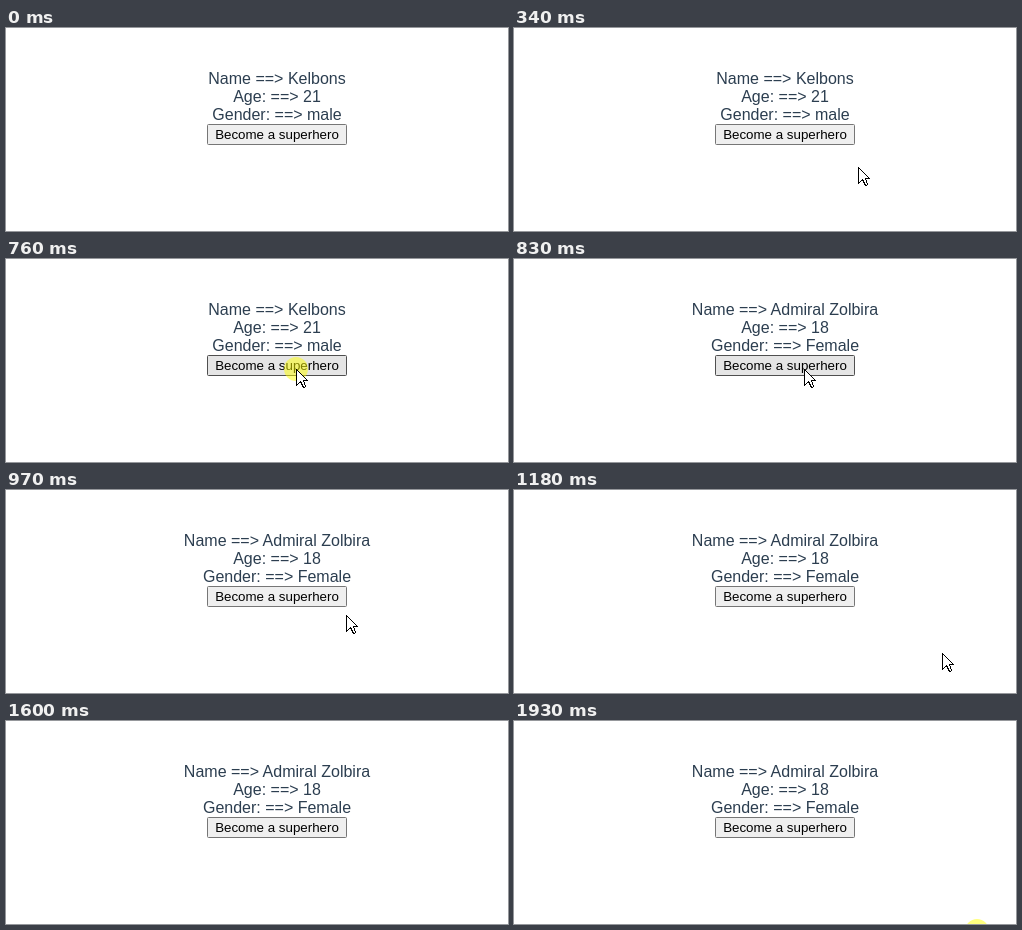
Write an HTML page that moves like this. It is 502 by 203 pixels and loops after 2 s.

```html
<!DOCTYPE html>
<html lang="en">
<head>
<meta charset="utf-8">
<title>Become a superhero</title>
<style>
  html, body { margin: 0; width: 100%; height: 100%; overflow: hidden; background: #fff; }
  svg { display: block; width: 100vw; height: 100vh; }
  text { font-family: "Liberation Sans", Arial, sans-serif; text-anchor: middle; white-space: pre; }
  .line { font-size: 16px; fill: #2c3e50; }
  .label { font-size: 13.333px; fill: #000; }
</style>
</head>
<body>
<svg viewBox="0 0 502 203">
  <text class="line" x="271" y="56"></text>
  <text class="line" x="271" y="74"></text>
  <text class="line" x="271" y="92"></text>
  <rect id="button" x="201.5" y="96.5" width="139" height="20" rx="1"/>
  <text class="label" x="271" y="111">Become a superhero</text>
  <circle id="press" r="12" fill="#ff0" fill-opacity=".5"/>
  <path id="cursor" d="M.5 .5V16.5L4.5 12.5 7.5 18.5H8.5L9.5 17.5 7.5 12V11.5H11.5Z"
        fill="#fff" stroke="#000" shape-rendering="crispEdges"/>
</svg>
<script>
const LOOP = 2000, STEP = 70, ENTER = 200, CLICK = 760, RELEASE = 830, LEAVE = 1600, SECOND_CLICK = 1930;

const people = [
  { Name: "Kelbons", "Age:": 21, "Gender:": "male" },
  { Name: "Admiral Zolbira", "Age:": 18, "Gender:": "Female" }
];

// Pointer tip at its turning points
const path = [
  { at: ENTER, x: 416, y: 191 },
  { at: 340, x: 344, y: 139 },
  { at: 550, x: 311, y: 120 },
  { at: CLICK, x: 290, y: 110 },
  { at: RELEASE, x: 290, y: 110 },
  { at: 970, x: 340, y: 125 },
  { at: 1320, x: 467, y: 179 },
  { at: LEAVE, x: 477, y: 203 }
];

const $ = id => document.getElementById(id);
const button = $("button"), press = $("press"), cursor = $("cursor");
const lines = document.querySelectorAll(".line");

const show = (el, on) => el.setAttribute("visibility", on ? "visible" : "hidden");
const place = (el, { x, y }) => el.setAttribute("transform", `translate(${x} ${y})`);
const overButton = ({ x, y }) => x >= 201 && x < 341 && y >= 96 && y < 117;
const easeOut = u => 1 - (1 - u) ** 1.3;

// The pointer is only redrawn once per STEP
function pointerAt(t) {
  if (t < ENTER || t >= LEAVE) return null;
  const now = ENTER + Math.floor((t - ENTER) / STEP) * STEP;
  const i = path.findIndex(p => p.at > now);
  const a = path[i - 1], b = path[i];
  const k = easeOut((now - a.at) / (b.at - a.at));
  const mix = axis => Math.round(a[axis] + (b[axis] - a[axis]) * k);
  return { x: mix("x"), y: mix("y") };
}

function render(t) {
  const tip = pointerAt(t);
  const person = people[t < RELEASE ? 0 : 1];
  Object.entries(person).forEach(([key, value], i) => {
    lines[i].textContent = `${key} ==> ${value}`;
  });

  const hover = tip && overButton(tip);
  button.setAttribute("fill", hover ? "#e5e5e5" : "#efefef");
  button.setAttribute("stroke", hover ? "#4f4f4f" : "#767676");

  show(cursor, tip);
  if (tip) place(cursor, tip);

  const clicked = t >= CLICK && t < RELEASE;
  show(press, clicked || t >= SECOND_CLICK);
  place(press, clicked ? tip : { x: 463, y: 210 });
}

const start = performance.now();
function tick() {
  render((performance.now() - start) % LOOP);
  requestAnimationFrame(tick);
}
tick();
</script>
</body>
</html>
```
